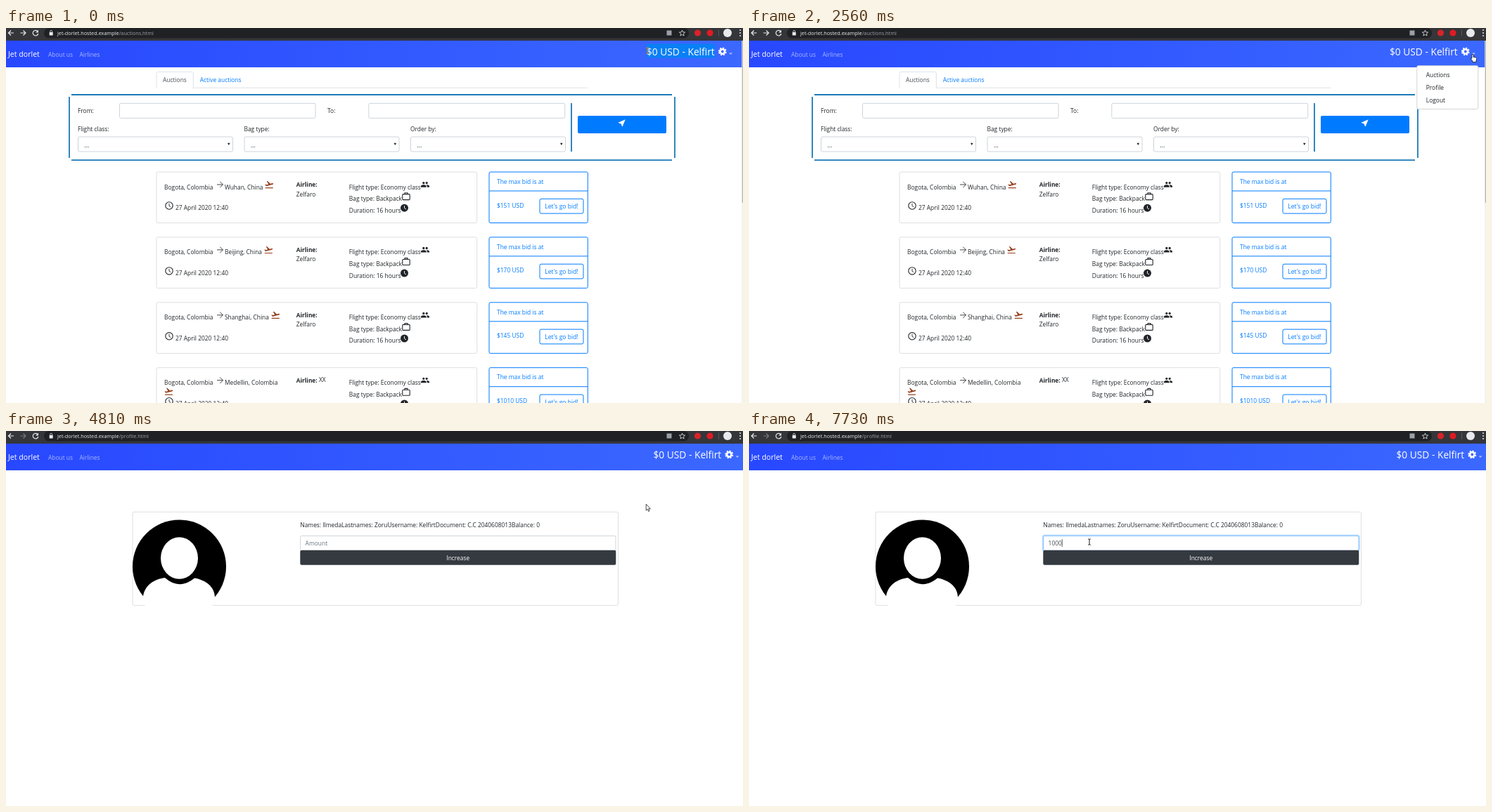
These frames come from a looping animation (1048x534 px, 8000 ms). An HTML page:

```html
<!DOCTYPE html>
<html lang="en">
<head>
<meta charset="utf-8">
<title>Flight auctions</title>
<style>
html, body { margin: 0; width: 100%; height: 100%; overflow: hidden; background: #fff; }
svg { display: block; width: 100vw; height: 100vh; }
text { font-family: "Open Sans", "Noto Sans", sans-serif; white-space: pre; }
</style>
</head>
<body>
<svg id="stage" viewBox="0 0 1048 534"></svg>
<script>
const LOOP = 8000, BLUE = '#007bff', INK = '#212529', LINE = '#dfdfdf', FIELD = '#ced4da';

// Markup helpers
const text = (x, y, s, fill = INK, size = 8.42, more = '') =>
  `<text x="${x}" y="${y}" fill="${fill}" font-size="${size}" ${more}>${s}</text>`;
const box = (x, y, w, h, fill = '#fff', stroke = 'none', r = 2, more = '') =>
  `<rect x="${x}" y="${y}" width="${w}" height="${h}" rx="${r}" fill="${fill}" stroke="${stroke}" ${more}/>`;
const line = (d, stroke, width = 1, more = '') =>
  `<path d="${d}" fill="none" stroke="${stroke}" stroke-width="${width}" ${more}/>`;
const shape = (d, fill, more = '') => `<path d="${d}" fill="${fill}" ${more}/>`;
const disc = (x, y, r, fill, more = '') => `<circle cx="${x}" cy="${y}" r="${r}" fill="${fill}" ${more}/>`;
const group = (id, body) => `<g id="${id}">${body}</g>`;
const icon = (x, y, d, fill, scale = .55) =>
  shape(d, fill, `transform="translate(${x} ${y}) scale(${scale})"`);

const PLANE = 'M2.5 19h19v2h-19zm19.57-9.36c-.21-.8-1.04-1.28-1.84-1.06L14.92 10l-6.9-6.43-1.93.51 4.14 7.17-4.97 1.33-1.97-1.54-1.45.39 2.59 4.49 1.6-.43 5.31-1.42 4.35-1.16L21 11.49c.81-.23 1.28-1.05 1.07-1.85z';
const PEOPLE = 'M16 11a3 3 0 1 0 0-6 3 3 0 0 0 0 6zm-8 0a3 3 0 1 0 0-6 3 3 0 0 0 0 6zm0 2c-2.33 0-7 1.17-7 3.5V19h14v-2.5c0-2.33-4.67-3.5-7-3.5zm8 0c-.29 0-.62.02-.97.05 1.16.84 1.97 1.97 1.97 3.45V19h6v-2.5c0-2.33-4.67-3.5-7-3.5z';
const SEND = 'M21 3L3 10.53v.98l6.84 2.65L12.48 21h.98z';
const STAR = 'M0-4.2L1.2-1.4 4.2-1.2 1.9.8 2.6 3.7 0 2.1-2.6 3.7-1.9.8-4.2-1.2-1.2-1.4z';

function toolbar() {
  const host = 'jet-dorlet.hosted.example', pale = '#e8eaed';
  const address = path => text(73, 10, `${host}<tspan fill="#9aa0a6">/${path}.html</tspan>`, pale, 7.3);
  return box(0, 0, 1048, 18, '#35363a', 'none', 0) + box(54, 0, 917, 14.5, '#202124', 'none', 7) +
    line('M11 7H3.5M7 3.5L3.5 7 7 10.5', pale, 1.2) +
    line('M20.5 7H28M24.5 3.5L28 7 24.5 10.5', pale, 1.2, 'id="forward"') +
    group('reload', line('M45.2 5A3.8 3.8 0 1 0 45.8 8', pale, 1.2) + shape('M46 2.8V6.6H42.2z', pale)) +
    group('stop', line('M39 4L45 10M45 4L39 10', pale, 1.2)) +
    box(61.7, 6, 5, 4.4, pale, 'none', .5) + line('M62.8 6V4.8a1.4 1.4 0 0 1 2.8 0V6', pale, .8) +
    group('auctionsUrl', address('auctions')) + group('profileUrl', address('profile')) +
    group('translate', box(939.5, 3.5, 7, 7, '#9aa0a6', 'none', 0)) +
    line(STAR, pale, .8, 'transform="translate(961.5 7.3)"') +
    disc(983.5, 7, 4.6, '#d8232a') + disc(1001, 7, 4.6, '#e01b22') +
    line('M1013.5 2.5V11.5', '#5f6368', .8) + disc(1026, 7, 6, pale) +
    [3, 7, 11].map(y => disc(1044, y, 1, pale)).join('');
}

function navbar() {
  const teeth = line('M1013.8 33.5a5 5 0 1 1 10 0a5 5 0 1 1-10 0', '#fff', 1.8, 'stroke-dasharray="2.2 1.727"');
  return `<linearGradient id="sky"><stop stop-color="#2848ff"/><stop offset="1" stop-color="#3b68ff"/></linearGradient>` +
    box(0, 18, 1048, 38, 'url(#sky)', 'none', 0) +
    text(3, 41, 'Jet dorlet', '#fff', 10.6) +
    text(60, 40.5, 'About us', '#a9b7ff') + text(104.5, 40.5, 'Airlines', '#a9b7ff') +
    group('account', box(911, 22.5, 97, 20, '#0a80f5', 'none', 0, 'id="selection"') +
      text(911, 38.5, '$0 USD - Kelfirt', '#fff', 13.75) + teeth +
      disc(1018.8, 33.5, 3.2, 'none', 'stroke="#fff" stroke-width="2.6"') +
      shape('M1028 35.5h5l-2.5 2.6z', '#b4c2ff'));
}

function searchForm() {
  const field = (x, label, y, w, left, top) =>
    text(x, y, label) + box(left, top, w, 21, '#fff', FIELD);
  const select = (x, label) => field(x, label, 147, 220, x + .5, 155) + text(x + 9.5, 169.5, '...') +
    shape(`M${x + 213} 163.8h3.6l-1.8 3.2z`, '#222');
  return line('M93 95H947M93 188.2H947M90 98V185M951 98V185M804 107V176', '#1b7ab8', 1.8) +
    field(102, 'From:', 121, 278.5, 161.5, 107.3) + field(457, 'To:', 121, 279, 515.8, 107.3) +
    select(102, 'Flight class:') + select(338.5, 'Bag type:') + select(575, 'Order by:') +
    box(813, 125, 126, 25, BLUE) + icon(869.2, 128.6, SEND, '#fff');
}

function auction([city, end, price, airline], i) {
  const wraps = !end;
  const plane = wraps ? [224.5, 26.8] : [end + 1.3, 11];
  return `<g transform="translate(0 ${205 + i * 92.9})">` +
    box(214, 0, 455.7, 72.5, '#fff', LINE) +
    text(225, 24.5, 'Bogota, Colombia') + line('M300 18H308.5M304.3 13.8L308.5 18 304.3 22.2', '#444', 1) +
    text(311, 24.5, city) + icon(plane[0], plane[1], PLANE, '#96411f', .58) +
    disc(232, 48, 5.2, 'none', `stroke="${INK}" stroke-width="1.1"`) + line('M232 45V48.4L234.4 50', INK, .9) +
    text(241, 54, '27 April 2020 12:40') +
    text(412.8, 21, 'Airline:', INK, 8.3, 'font-weight="700"') +
    (wraps ? text(445, 20.5, airline) : text(412.8, 34.5, airline)) +
    text(487.8, 24.5, 'Flight type: Economy class') + icon(589.4, 11.2, PEOPLE, INK) +
    text(487.8, 41.2, 'Bag type: Backpack') +
    box(563.8, 31.6, 10.4, 8, 'none', INK, 1, 'stroke-width="1.1"') + line('M567 31.5V29.7h4V31.5', INK, 1.1) +
    text(487.8, 57.7, 'Duration: 16 hours') + disc(566.5, 51.2, 5.5, INK) + line('M566.5 48V51.5L569 53', '#fff', .9) +
    box(687, 0, 140.3, 72.5, '#fff', BLUE) + line('M687 27H827', BLUE) +
    text(698, 16.8, 'The max bid is at', BLUE) + text(698, 50.5, `$${price} USD`, BLUE) +
    box(759, 38.3, 62, 20.8, '#fff', BLUE) + text(790, 52.3, "Let's go bid!", BLUE, 8.6, 'text-anchor="middle"') +
    '</g>';
}

function auctionsPage() {
  const flights = [
    ['Wuhan, China', 366, 151, 'Zelfaro'], ['Beijing, China', 365, 170, 'Zelfaro'],
    ['Shanghai, China', 375, 145, 'Zelfaro'], ['Medellin, Colombia', 0, 1010, 'XX']];
  return line('M214 85.2H827', '#dee2e6') +
    shape('M214 86V64.5q0-2 2-2H264.3q2 0 2 2V86', '#fff', 'stroke="#dee2e6"') +
    text(223, 77, 'Auctions', '#495057') + text(275.8, 77, 'Active auctions', BLUE) +
    searchForm() + flights.map(auction).join('') +
    box(1046.3, 18, 2, 516, '#f1f1f1', 'none', 0) + box(1046.7, 18, 1.3, 231, '#b5b5b5', 'none', 0);
}

function profilePage() {
  return box(180, 115.3, 690.5, 133, '#fff', LINE) + disc(246.5, 193, 66.5, '#000') +
    `<ellipse cx="246.5" cy="181" rx="26.5" ry="29.7" fill="#fff"/>` +
    shape('M195 235.5C198 216 216 210 226 209Q246.5 227 268 209.5C279 211 297 219 297 237L290 261H200z', '#fff') +
    text(418.3, 136.7, 'Names: IlmedaLastnames: ZoruUsername: KelfirtDocument: C.C 2040608013Balance: 0') +
    box(418.1, 148.8, 449.3, 22, 'none', '#bfdeff', 2.5, 'id="glow" stroke-width="2.8"') +
    box(418.6, 149.3, 448.4, 21, '#fff', FIELD, 2, 'id="amount"') +
    text(425.6, 162.6, 'Amount', '#6c757d', 8.42, 'id="entry"') +
    line('M0 154V165', '#222', .7, 'id="caret"') +
    box(418.3, 169.8, 449, 20.9, '#343a40') +
    text(642.8, 183.7, 'Increase', '#fff', 8.42, 'text-anchor="middle"');
}

function menu() {
  return box(949.8, 53.8, 87, 61.7, '#fff', '#d5d5d5') +
    text(962.8, 70.2, 'Auctions') + text(962.8, 88, 'Profile') + text(962.8, 105.6, 'Logout');
}

const outline = 'stroke="#000" stroke-width=".7" stroke-linejoin="round"';
const pointers =
  group('arrow', shape('M0 0V9L2 7.2 3.4 10.3 4.8 9.7 3.4 6.6H6.2z', '#fff', outline)) +
  group('hand', shape('M-1 .8Q0-.6 1 .8V4.2L5 5Q6 5.3 5.8 6.5L5 9.5V11.5H0V10L-2.6 6.8Q-2.6 5.4-1 6.2z', '#fff', outline)) +
  group('beam', line('M-1.8-4.2Q0-4.2 0-3.4Q0-4.2 1.8-4.2M0-3.8V3.8M-1.8 4.2Q0 4.2 0 3.4Q0 4.2 1.8 4.2', '#fff', .9));

stage.innerHTML = box(0, 0, 1048, 534, '#fff', 'none', 0) + toolbar() + navbar() +
  group('auctions', auctionsPage()) + group('profile', profilePage()) + group('menu', menu()) +
  `<g id="pointer">${pointers}</g>`;

const el = id => document.getElementById(id);
const show = (id, on) => el(id).setAttribute('visibility', on ? 'visible' : 'hidden');
el('beam').style.mixBlendMode = 'difference';

// Pointer path: time, x, y
const path = [
  [0, 912, 32], [40, 912, 32], [450, 949, 36], [650, 950, 36], [730, 952, 37], [890, 952, 37],
  [1030, 954, 40], [1300, 985, 41], [1500, 1013, 41], [1680, 1026, 40], [1710, 1026, 40], [2080, 1029, 37],
  [2560, 1029, 37], [2750, 1018, 49], [3000, 992, 69], [3290, 973, 84], [3390, 973, 84], [3450, 972, 85],
  [4220, 972, 85], [4460, 964, 87], [4540, 961, 88], [4710, 958, 89], [4810, 911, 104],
  [5000, 760, 130], [5200, 590, 151], [5350, 508, 157], [5470, 485, 158], [6190, 485, 158],
  [6200, 484, 158], [LOOP, 484, 158]];

function pointerAt(t) {
  const i = path.findIndex(p => p[0] > t);
  const [t0, x0, y0] = path[i - 1], [t1, x1, y1] = path[i];
  const k = (t - t0) / (t1 - t0);
  return [x0 + (x1 - x0) * k, y0 + (y1 - y0) * k];
}

function draw(now) {
  const t = now % LOOP;
  const between = (a, b) => t >= a && t < b;
  const leaving = t >= 3680, onProfile = t >= 4500, loading = between(3680, 4710);

  show('auctions', !onProfile);
  show('profile', onProfile);
  show('menu', between(2250, 3680));
  show('auctionsUrl', !leaving);
  show('profileUrl', leaving);
  show('stop', loading);
  show('reload', !loading);
  show('translate', !loading);
  el('forward').setAttribute('stroke', t < 4710 ? '#e8eaed' : '#77797d');
  el('account').setAttribute('transform', `translate(${onProfile ? 9.5 : 0} 0)`);

  const dragged = Math.max(0, Math.min(8, Math.floor((t - 40) / 58.6) + 1));
  const edge = 911 + dragged * 4.75;
  el('selection').setAttribute('x', edge);
  el('selection').setAttribute('width', 1008 - edge);
  show('selection', t < 890);

  const focus = Math.max(0, Math.min(1, (t - 5800) / 110));
  el('glow').setAttribute('opacity', focus);
  el('amount').setAttribute('stroke', focus > .4 ? '#80bdff' : FIELD);

  const typed = [6870, 7170, 7440, 7730].filter(key => t >= key).length;
  el('entry').textContent = typed ? '1000'.slice(0, typed) : 'Amount';
  el('entry').setAttribute('fill', typed ? '#495057' : '#6c757d');
  el('caret').setAttribute('transform', `translate(${425.8 + typed * 4.87} 0)`);
  show('caret', between(5820, 6330) || t >= 6850);

  const kind = t < 1480 || t >= 5200 ? 'beam' : t < 3780 ? 'hand' : 'arrow';
  ['arrow', 'hand', 'beam'].forEach(id => show(id, id === kind));
  el('pointer').setAttribute('transform', `translate(${pointerAt(t)})`);
}

const start = performance.now();
function tick() {
  draw(performance.now() - start);
  requestAnimationFrame(tick);
}
tick();
</script>
</body>
</html>
```
